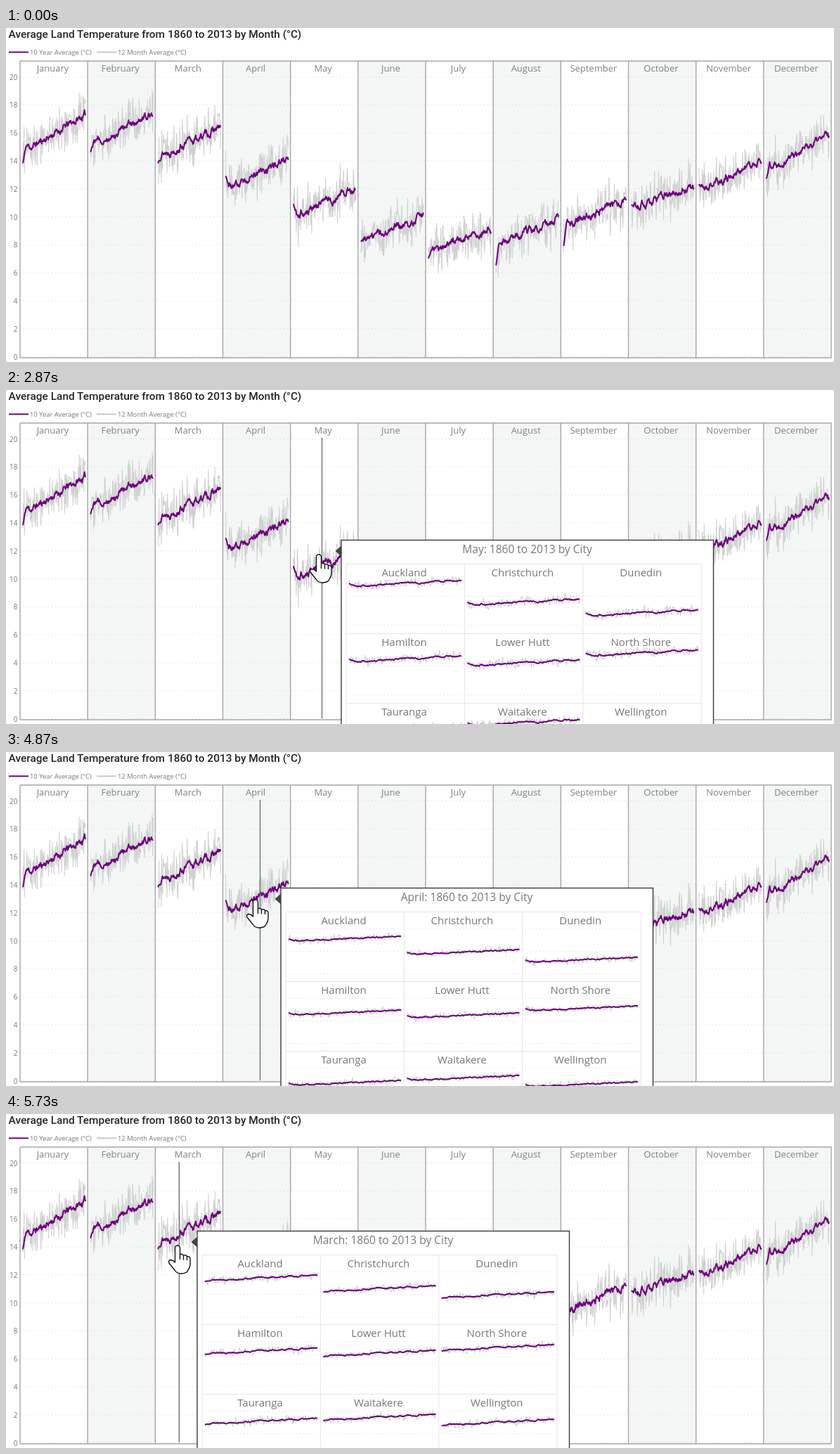
Recreate the animation shown at these times as an HTML page. Size 1178 px wide and 475 px high, loop 7.37 s.

```html
<!DOCTYPE html>
<html lang="en">
<head>
<meta charset="utf-8">
<title>Land temperature by month</title>
<style>
  html, body { margin: 0; height: 100%; overflow: hidden; background: #fff; }
  svg { display: block; width: 100vw; height: 100vh; }
  text { font-family: "Open Sans", "Noto Sans", sans-serif; fill: #777; }
  .title { font: 500 15.45px Roboto, sans-serif; fill: #252423; }
  .small { font-size: 9.4px; }
  .axis { font-size: 10px; text-anchor: end; }
  .month { font-size: 13px; text-anchor: middle; fill: #808080; }
  .city { font-size: 15px; text-anchor: middle; }
  .head { font-size: 15.5px; text-anchor: middle; }
  path { fill: none; stroke-linejoin: round; }
  .avg { stroke: #6b007b; stroke-width: 2; }
  .raw { stroke: #d0d0d0; stroke-width: 1.1; }
  .dots { stroke: #d4d4d4; stroke-dasharray: 1 4; }
  .frame { stroke: #a6a6a6; stroke-width: 1.4; }
  .cell { stroke: #e4e4e4; }
</style>
</head>
<body>
<svg id="stage" viewBox="0 0 1178 475"></svg>
<script>
const LEFT = 20, COL = 96.17, YEARS = 153, LOOP = 7370;

// Each month: first value, level of the early decades, last value
const MONTHS = {
  January: [13.8, 15, 17.2], February: [14.6, 15.4, 17.5], March: [13.8, 14.6, 16.3],
  April: [12.9, 12.3, 14], May: [10.9, 10.3, 12], June: [8.2, 8.5, 9.9],
  July: [7, 7.8, 9.1], August: [6.5, 8.2, 9.8], September: [7.9, 9.6, 11.2],
  October: [10.8, 10.8, 12.2], November: [12.3, 12.1, 14], December: [12.7, 13.8, 15.8]
};
const NAMES = Object.keys(MONTHS);
const CITIES = ['Auckland', 'Christchurch', 'Dunedin', 'Hamilton', 'Lower Hutt',
  'North Shore', 'Tauranga', 'Waitakere', 'Wellington'];

function seeded(seed) {
  return () => {
    seed = (seed + 0x6D2B79F5) | 0;
    let r = Math.imul(seed ^ (seed >>> 15), 1 | seed);
    r ^= r + Math.imul(r ^ (r >>> 7), 61 | r);
    return ((r ^ (r >>> 14)) >>> 0) / 2 ** 32;
  };
}

const range = n => [...Array(n).keys()];
const ramp = (x, from, to) => Math.min(1, Math.max(0, (x - from) / (to - from)));

// A quick settling from the first value, a steady warming, and a slow wander
const series = Object.values(MONTHS).map(([first, early, last], m) => {
  const random = seeded(m + 11);
  let drift = 0;
  return range(YEARS + 1).map(i => {
    const f = i / YEARS;
    drift = drift * .82 + (random() - .5) * .36;
    return early + (first - early) * (1 - ramp(f, 0, .05))
      + (last - early) * ramp(f, .15, .98) + drift * ramp(f, 0, .05);
  });
});

function noisy(values, seed) {
  const random = seeded(seed);
  return values.map(v => v + (random() + random() + random() - 1.5) * 1.6);
}

const path = (cls, d) => `<path class="${cls}" d="${d}"/>`;
const text = (cls, x, y, s) => `<text class="${cls}" x="${x}" y="${y}">${s}</text>`;

function curve(cls, values, x, width, toY) {
  return path(cls, 'M' + values.map((v, i) =>
    (x + width * i / YEARS).toFixed(1) + ' ' + toY(v).toFixed(1)).join('L'));
}

function chart() {
  const toY = v => 467 - 19.9 * v;
  let out = text('title', 3.5, 13.7, 'Average Land Temperature from 1860 to 2013 by Month (°C)')
    + path('avg', 'M4 34.4H32') + text('small', 34, 38.3, '10 Year Average (°C)')
    + '<path d="M129 34.4H157" stroke="#c8c8c8" stroke-width="2"/>'
    + text('small', 159, 38.3, '12 Month Average (°C)');
  for (let m = 1; m < 12; m += 2)
    out += `<rect x="${LEFT + COL * m}" y="47" width="${COL}" height="422" fill="#f4f6f6"/>`;
  for (let v = 0; v <= 20; v += 2)
    out += path('dots', `M20 ${toY(v) + .5}H1174`) + text('axis', 16.5, toY(v) + 4.5, v);
  NAMES.forEach((name, m) => {
    const x = LEFT + COL * m;
    out += curve('raw', noisy(series[m], m + 70), x + 4, 89, toY)
      + curve('avg', series[m], x + 4, 89, toY)
      + text('month', x + 46.5, 62, name)
      + path('frame', `M${x} 47V469`);
  });
  return out + path('frame', 'M20 47H1174V469H20');
}

// Small charts: y of the last value, px per degree, spread between cities, grid rows
const PANELS = {
  4: { end: 57, scale: 4.4, spread: 1.4, rows: [80, 121] },
  3: { end: 69, scale: 3.2, spread: 1, rows: [58, 90, 122] },
  2: { end: 63, scale: 3.5, spread: .8, rows: [58, 90, 122] }
};
const OFFSETS = [0, 19, 30, 6, 10, 0, 7, 0, 9];

function panel(m) {
  const { end, scale, spread, rows } = PANELS[m];
  const values = series[m], last = MONTHS[NAMES[m]][2];
  return `<g id="panel${m}">` + CITIES.map((city, i) => {
    const x = 11 + 168.4 * (i % 3), row = 99 * Math.floor(i / 3);
    const toY = v => row + end + OFFSETS[i] * spread + (last - v) * scale;
    return rows.map(y => path('dots', `M${x} ${row + y}h160`)).join('')
      + curve('raw', noisy(values, m * 20 + i), x, 160, toY)
      + curve('avg', values, x, 160, toY);
  }).join('') + '</g>';
}

function tooltip() {
  let out = '<rect width="529.5" height="400" fill="#fff" stroke="#3a3a3a" stroke-width="1.4"/>'
    + '<path d="M0 8L-8.5 15.5L0 23Z" style="fill:#444"/>'
    + '<text class="head" id="head" x="264.5" y="18"></text>';
  for (const i of range(4))
    out += path('cell', `M${7 + 168.4 * i} 34V331`) + path('cell', `M7 ${34 + 99 * i}H512`);
  out += Object.keys(PANELS).map(panel).join('');
  CITIES.forEach((city, i) => {
    out += text('city', 89.5 + 168.4 * (i % 3), 51 + 99 * Math.floor(i / 3), city);
  });
  return out;
}

const HAND = 'M-3.5 24V3.5a3.5 3.5 0 0 1 7 0V13a3.2 3.2 0 0 1 5 1.5a3 3 0 0 1 5 1.5'
  + 'a3 3 0 0 1 4.5 2.5V27C18 32 15 34 14 37Q11 40 5 40Q-1 40-4 35L-12 25'
  + 'Q-13.5 21.5-10 20.5Q-7 20.5-3.5 24ZM3.5 13V20M8.5 15V20.5M13.5 16.5V21';

const $ = id => document.getElementById(id);
$('stage').innerHTML = chart()
  + '<g id="hover"><path id="line" d="M0 68V467" stroke="#707070" stroke-width="1.4"/>'
  + `<g id="tip">${tooltip()}</g>`
  + `<path id="hand" d="${HAND}" style="fill:#fff" stroke="#111" stroke-width="1.4"/></g>`;

// The picture advances in steps: start, end, count
const BURSTS = [[200, 680, 7], [1140, 1230, 2], [2870, 3480, 9],
  [4870, 5330, 7], [5420, 5580, 3], [5650, 5730, 2]];

function snap(t) {
  let at = 0;
  for (const [start, end, count] of BURSTS) {
    if (t < start) break;
    const gap = (end - start) / (count - 1);
    at = start + gap * Math.min(count - 1, Math.floor((t - start) / gap + 1e-6));
  }
  return at;
}

// Path of the hand: time, x, y
const KEYS = [[200, 640, 420], [600, 451, 234], [2790, 451, 234], [2870, 445, 234],
  [3390, 365, 214], [4790, 365, 214], [4870, 355, 210], [5330, 273, 192],
  [5580, 250, 188], [5640, 246, 187], [5730, 244, 187]];

function handAt(t) {
  const next = Math.max(1, KEYS.findIndex(key => key[0] > t));
  const [a, b] = t >= KEYS.at(-1)[0] ? KEYS.slice(-2) : [KEYS[next - 1], KEYS[next]];
  const f = ramp(t, a[0], b[0]);
  return [1, 2].map(i => a[i] + (b[i] - a[i]) * f);
}

const show = (id, on) => $(id).style.display = on ? '' : 'none';
const move = (id, x, y) => $(id).setAttribute('transform', `translate(${x} ${y})`);

function draw(now) {
  const t = snap(now % LOOP);
  // The line trails the hand, and the tooltip trails the line
  const lineX = handAt(t - 40)[0] + 1.5;
  const [tipX, tipY] = handAt(t - 90);
  const month = Math.floor((lineX - LEFT) / COL);
  const loaded = t < 3300 ? 4 : t < 5500 ? 3 : 2; // charts load after the heading
  show('hover', t >= 200);
  move('hand', ...handAt(t));
  move('line', lineX, 0);
  move('tip', tipX + 26, tipY - 20.5);
  $('tip').style.opacity = ramp(t, 1050, 1230);
  $('head').textContent = `${NAMES[month]}: 1860 to 2013 by City`;
  for (const m in PANELS) show('panel' + m, +m === loaded);
  requestAnimationFrame(() => draw(performance.now() - begin));
}
const begin = performance.now();
draw(0);
</script>
</body>
</html>
```
